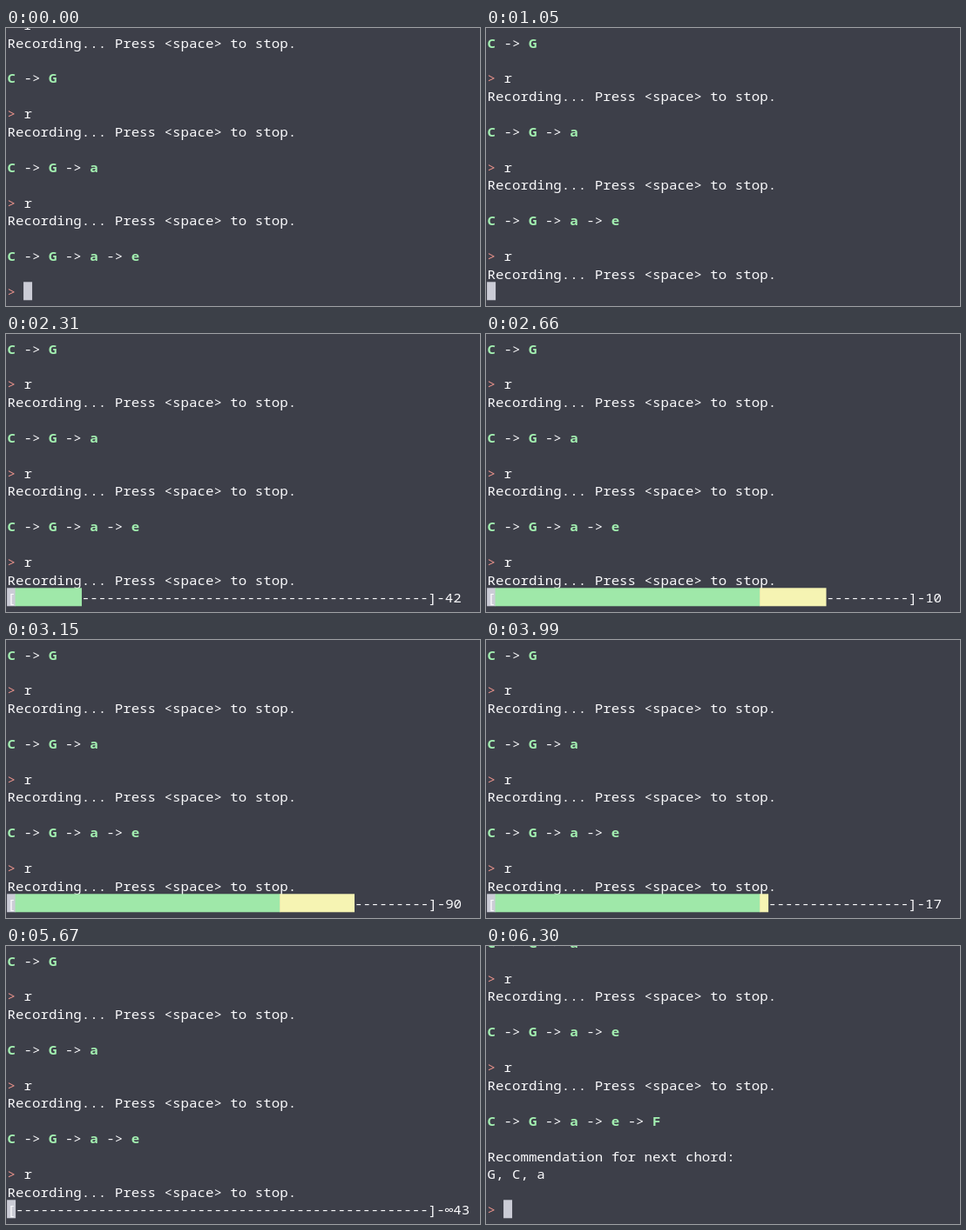
Write an HTML page that moves like this. It is 544 by 320 pixels and loops after 8 s.

```html
<!DOCTYPE html>
<html lang="en">
<head>
<meta charset="utf-8">
<title>Chord recorder</title>
<style>
  html, body { margin: 0; width: 100%; height: 100%; overflow: hidden; background: #3d3f49; }
  svg { display: block; width: 100vw; height: 100vh; }
  text { font: 15.81px "Noto Sans Mono", "DejaVu Sans Mono", monospace; fill: #fafafc; white-space: pre; }
  .chord { font-weight: 700; fill: #a3f0b1; }
  .prompt { fill: #e8928b; }
</style>
</head>
<body>
<svg viewBox="0 0 544 320" preserveAspectRatio="none">
  <rect width="544" height="320" fill="#3d3f49"/>
  <g id="screen"></g>
</svg>
<script>
const LOOP = 8000, TICK = 70;
const COL = 9.486, ROW = 20.46, LEFT = 1.5, BASE = 309, TOP = 292.3;
const CAPS = 0.93; // lower letterforms, as in the terminal face
const WIDTH = 50, YELLOW_FROM = 32;
const T = { type: 560, enter: 1050, meter: 1330, silent: 5670, done: 5740 };
const screen = document.getElementById("screen");

const esc = s => s.replace(/&/g, "&amp;").replace(/</g, "&lt;").replace(/>/g, "&gt;");
const span = (cls, s) => `<tspan class="${cls}">${esc(s)}</tspan>`;
const chords = s => s.split(" ").map(c => span("chord", c)).join(esc(" -> "));
const colX = c => LEFT + c * COL;
const block = (from, to, fill) => to > from
  ? `<rect x="${colX(from) - 0.4}" y="${TOP}" width="${(to - from) * COL + 0.5}" height="21" fill="${fill}"/>` : "";
const line = (markup, row, col = 0) => markup
  ? `<text transform="translate(${colX(col)} ${BASE - row * ROW}) scale(1 ${CAPS})">${markup}</text>` : "";

const prompt = span("prompt", ">");
const take = [prompt + " r", esc("Recording... Press <space> to stop."), ""];
const log = [
  ...take, chords("C G"), "",
  ...take, chords("C G a"), "",
  ...take, chords("C G a e"), "",
  ...take, chords("C G a e F"), "",
  "Recommendation for next chord:", "G, C, a", "",
  prompt
];

// input level in dB over time
const levels = [
  [1330, -56], [1820, -49], [2310, -42], [2450, -34], [2590, -16], [2660, -10],
  [2800, -7], [3150, -9], [3990, -17], [4410, -18], [4550, -18],
  [4830, -45], [4900, -45], [4970, -62], [5530, -143], [5600, -143]
];

function levelAt(t) {
  if (t >= T.silent) return -Infinity;
  const i = levels.findIndex(k => k[0] >= t);
  if (i < 0) return levels[levels.length - 1][1];
  if (i === 0) return levels[0][1];
  const [t0, a] = levels[i - 1], [t1, b] = levels[i];
  const f = (t - t0) / (t1 - t0);
  const noise = Math.sin(t * 12.9898) * 43758.5453;
  const jitter = a === b ? 0 : (noise - Math.floor(noise) - 0.5) * 3 * Math.sin(Math.PI * f);
  return Math.round(a + (b - a) * f + jitter);
}

// each reading overwrites the last one without clearing its tail
function readout(t) {
  let out = "";
  for (let k = T.meter; k <= t; k += TICK) {
    const v = levelAt(k);
    const s = v === -Infinity ? "-∞" : String(v);
    out = s + out.slice(s.length);
  }
  return out;
}

function meter(t) {
  const n = Math.max(0, Math.min(WIDTH, WIDTH + levelAt(t)));
  const green = Math.min(n, YELLOW_FROM);
  return block(1, 1 + green, "#9fe8a9") + block(1 + green, 1 + n, "#f6f4b3") +
    line("[", 0) + line("-".repeat(WIDTH - n) + "]" + readout(t), 0, 1 + n);
}

function draw(t) {
  const last = t < T.enter ? 15 : t < T.done ? 17 : 23;
  const cursor = t < T.type ? 2 : t < T.enter ? 3 : t < T.done ? 0 : 2;
  let out = block(cursor, cursor + 1, "#cbccd6");
  for (let row = 0; row < 16; row++) {
    const i = last - row;
    if (i >= 0) out += line(i === 15 && t < T.type ? prompt : log[i], row);
  }
  if (t >= T.meter && t < T.done) out += meter(t);
  screen.innerHTML = out;
}

let shown = -1;
function frame(now) {
  const t = Math.floor((now % LOOP) / TICK) * TICK;
  if (t !== shown) draw(shown = t);
  requestAnimationFrame(frame);
}
draw(0);
requestAnimationFrame(frame);
</script>
</body>
</html>
```
